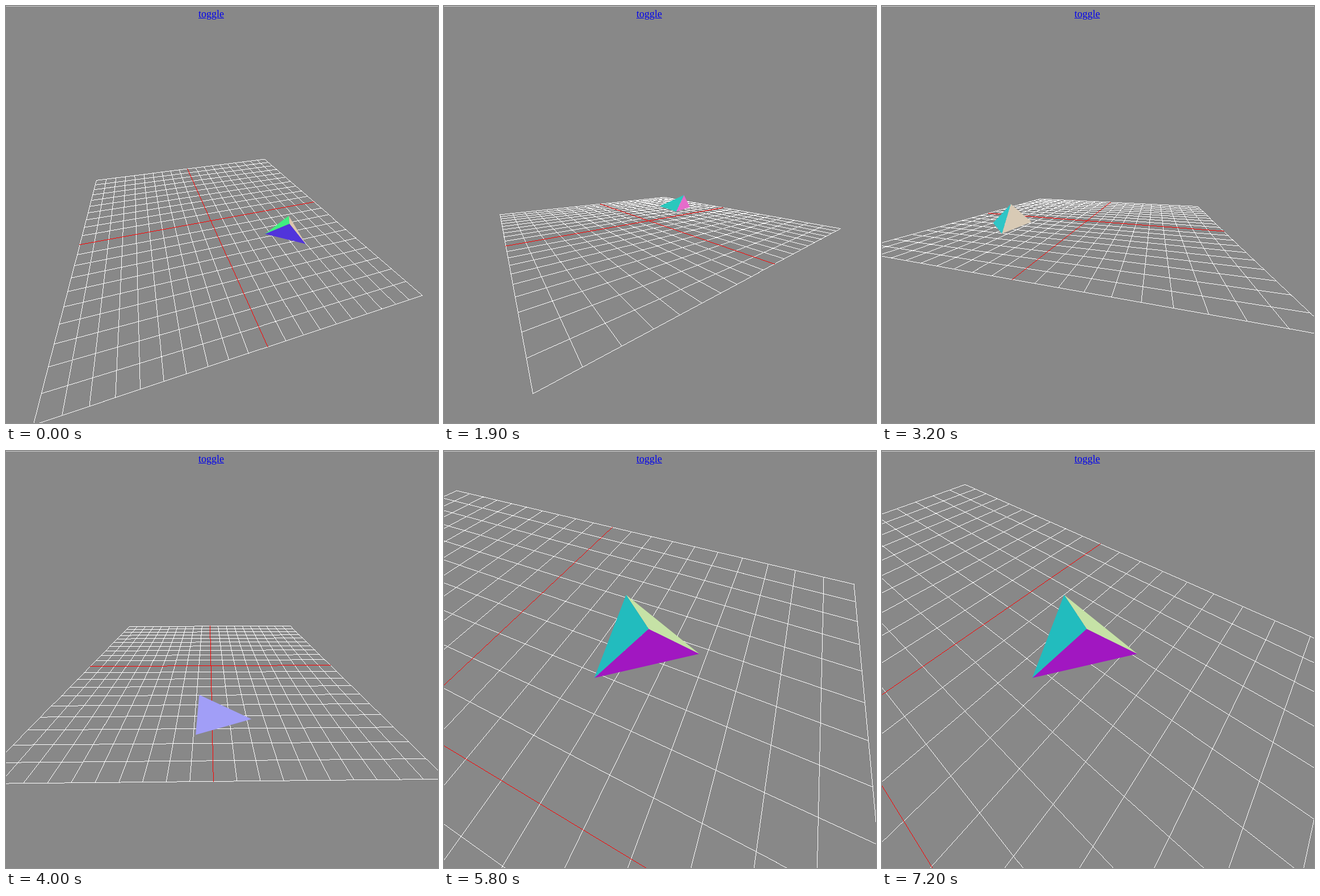
Animation, 761 px wide and 735 px high, one loop 7300 ms. Source, as an HTML page with a canvas:

```html
<!DOCTYPE html>
<html>
<head>
<meta charset="utf-8">
<style>
  html, body { margin: 0; width: 100%; height: 100%; overflow: hidden; background: #888; }
  canvas { display: block; }
  a { position: absolute; left: 339px; top: 4px; color: #00e; font: 18px/20px "Liberation Serif", Times, serif; text-decoration: underline; }
</style>
</head>
<body>
<canvas id="stage" width="761" height="735"></canvas>
<a id="link">toggle</a>
<script>
const ctx = document.getElementById('stage').getContext('2d');
const link = document.getElementById('link');
const LOOP = 7300, STEP = 100, TOGGLE = 4900;
const FOCAL = 376, CX = 360.5, CY = 378.1, NEAR = 1;
const HALF = 10, ORBIT = 6, SIZE = 1.5;

// [ms, heading of the craft around the origin in degrees]
const craftKeys = [[0, -397.2], [1900, -253], [3200, -156.8], [5000, -21.45], [5800, 39.25], [6500, 92], [7200, 144.7]];
// [ms, azimuth, elevation] of the dragged camera
const dragKeys = [[800, 16, 39.6], [1900, -54.4, 14.3], [2400, -48, 51], [2700, -42, 89], [3200, -17.3, 14.2], [3800, 0.6, 29.4]];

const rad = deg => deg * Math.PI / 180;

function sample(keys, t) {
  if (t <= keys[0][0]) return keys[0].slice(1);
  const next = keys.findIndex(k => k[0] >= t);
  if (next < 0) return keys[keys.length - 1].slice(1);
  const a = keys[next - 1], b = keys[next], k = (t - a[0]) / (b[0] - a[0]);
  return a.map((v, i) => v + (b[i] - v) * k).slice(1);
}

// Camera space: right, up, depth. World points are [x, y, height].
function makeCamera(azimuth, elevation, distance, pivot) {
  const ca = Math.cos(azimuth), sa = Math.sin(azimuth);
  const ce = Math.cos(elevation), se = Math.sin(elevation);
  const turn = ([x, y, h]) => {
    const f = x * sa + y * ca;
    return [x * ca - y * sa, f * se + h * ce, f * ce - h * se];
  };
  const view = ([x, y, h]) => {
    const p = turn([x - pivot[0], y - pivot[1], h]);
    return [p[0], p[1], p[2] + distance];
  };
  return { turn, view };
}

const project = ([x, y, z]) => [CX + FOCAL * x / z, CY - FOCAL * y / z];

// Hard-edged one pixel line, cut at the near plane
function line(camera, from, to, color) {
  let a = camera.view(from), b = camera.view(to);
  if (a[2] < b[2]) [a, b] = [b, a];
  if (a[2] <= NEAR) return;
  if (b[2] < NEAR) {
    const k = (a[2] - NEAR) / (a[2] - b[2]);
    b = a.map((v, i) => v + (b[i] - v) * k);
  }
  const [x0, y0] = project(a), [x1, y1] = project(b);
  const n = Math.ceil(Math.max(Math.abs(x1 - x0), Math.abs(y1 - y0)));
  ctx.fillStyle = color;
  for (let i = 0; i <= n; i++) {
    const x = Math.round(x0 + (x1 - x0) * i / n), y = Math.round(y0 + (y1 - y0) * i / n);
    if (x >= 0 && x < 761 && y >= 0 && y < 735) ctx.fillRect(x, y, 1, 1);
  }
}

function drawGrid(camera) {
  const pair = (i, color) => {
    line(camera, [i, -HALF, 0], [i, HALF, 0], color);
    line(camera, [-HALF, i, 0], [HALF, i, 0], color);
  };
  for (let i = -HALF; i <= HALF; i++) if (i) pair(i, '#fff');
  pair(0, '#f00');
}

function drawCraft(camera, heading) {
  const c = Math.cos(heading), s = Math.sin(heading);
  const place = ([u, v, h]) => [u * c - v * s, u * s + v * c, h];
  const vertex = (u, v, h) => camera.view(place([ORBIT + u * SIZE, v * SIZE, h * SIZE]));
  const inner = vertex(-1, 0, 0), outer = vertex(1, 0, 0), apex = vertex(0, 0, 1), tip = vertex(0, 2, 0);
  const faces = [
    [[0, -1, 0], inner, outer],
    [[2 / 3, 1 / 3, 2 / 3], outer, tip],
    [[-2 / 3, 1 / 3, 2 / 3], tip, inner]
  ];
  for (const [normal, p, q] of faces) {
    const n = camera.turn(place(normal));
    if (n[0] * apex[0] + n[1] * apex[1] + n[2] * apex[2] >= 0) continue;
    // Each face is tinted by its normal as seen by the camera
    const tint = [n[0], n[1], -n[2]].map(v => Math.round((v * 0.5 + 0.5) * 255));
    ctx.fillStyle = `rgb(${tint})`;
    ctx.beginPath();
    for (const corner of [apex, p, q]) ctx.lineTo(...project(corner));
    ctx.fill();
  }
}

function draw(t) {
  const heading = rad(sample(craftKeys, t)[0]);
  let camera;
  if (t < TOGGLE) {
    const [azimuth, elevation] = sample(dragKeys, t);
    camera = makeCamera(rad(azimuth), rad(elevation), 17.77, [0, 0]);
  } else {
    const pivot = [ORBIT * Math.cos(heading), ORBIT * Math.sin(heading)];
    camera = makeCamera(rad(15.15) - heading, rad(58.1), 5.89, pivot);
  }
  ctx.fillStyle = '#888';
  ctx.fillRect(0, 0, 761, 735);
  drawGrid(camera);
  drawCraft(camera, heading);
  ctx.fillStyle = '#ccc';
  ctx.fillRect(0, 0, 761, 1);
  link.style.color = t >= TOGGLE - STEP && t < TOGGLE ? '#f00' : '#00e';
}

const start = performance.now();
let shown = -1;
function tick() {
  const t = Math.floor((performance.now() - start) % LOOP / STEP) * STEP;
  if (t !== shown) draw(shown = t);
  requestAnimationFrame(tick);
}
tick();
</script>
</body>
</html>
```
